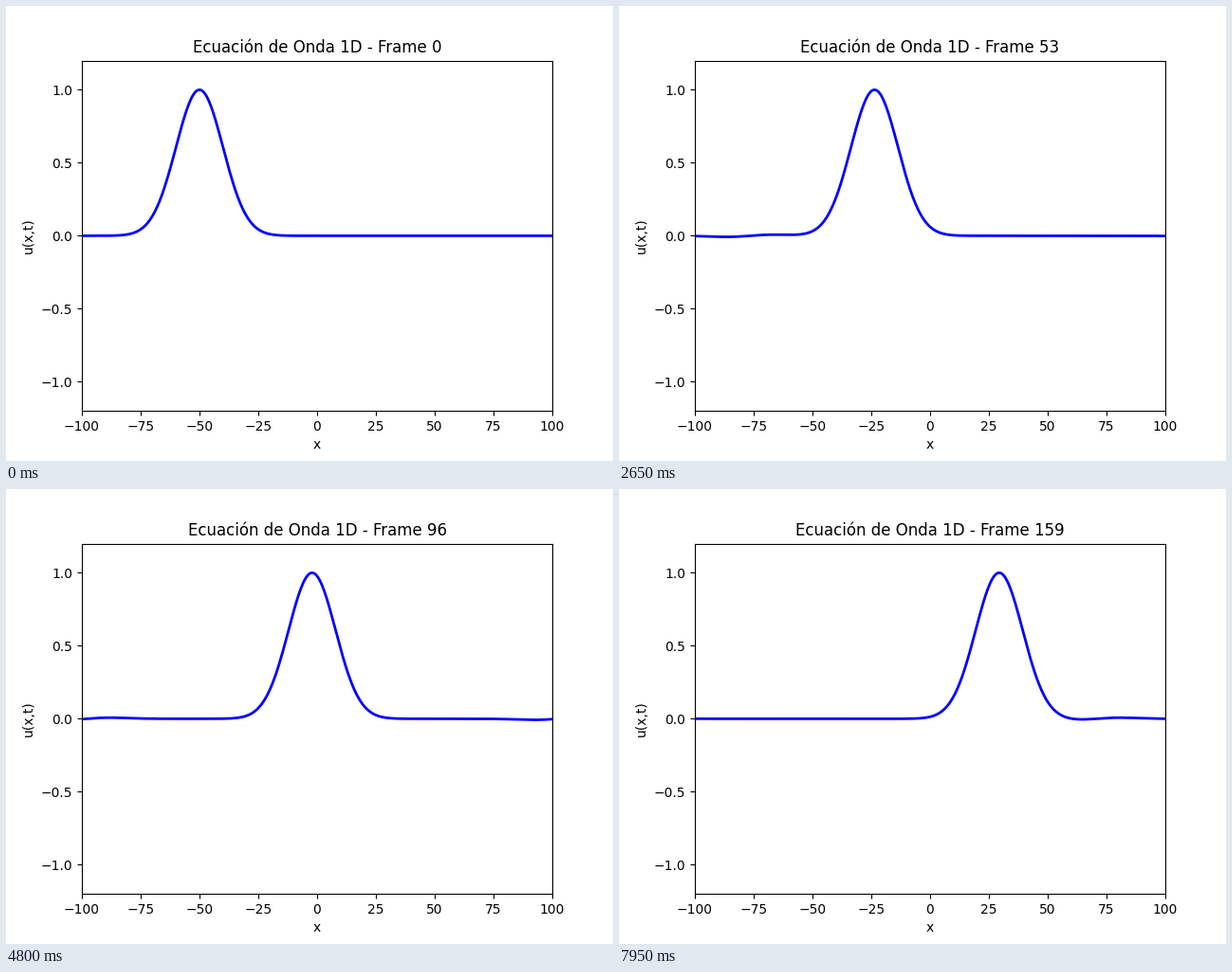
These frames come from a looping animation (640 by 480 pixels, 8 s). A matplotlib script:

```python
import numpy as np
import matplotlib.pyplot as plt
from matplotlib.animation import FuncAnimation

FRAMES = 160
INTERVAL = 50           # ms
HALF = 100.0            # domain is [-HALF, HALF], periodic
START, SIGMA = -50.0, 10.0
STEP = 0.5              # distance travelled per frame
EPS = STEP / 4          # first-order error of the starting step

x = np.linspace(-HALF, HALF, 401)


def pulse(center):
    """Gaussian and its slope on the periodic domain."""
    d = (x - center + HALF) % (2 * HALF) - HALF
    g = np.exp(-d**2 / (2 * SIGMA**2))
    return g, -d / SIGMA**2 * g


def wave(n):
    g, slope = pulse(START + STEP * n)
    _, back = pulse(START - STEP * n)
    return g + EPS * (slope - back)


fig, ax = plt.subplots(figsize=(6.4, 4.8), dpi=100)
line, = ax.plot(x, wave(0), color="blue", lw=2)
ax.set_xlim(-HALF, HALF)
ax.set_ylim(-1.2, 1.2)
ax.set_xlabel("x")
ax.set_ylabel("u(x,t)")
title = ax.set_title("Ecuación de Onda 1D - Frame 0")


def update(n):
    line.set_ydata(wave(n))
    title.set_text(f"Ecuación de Onda 1D - Frame {n}")
    return line, title


anim = FuncAnimation(fig, update, frames=FRAMES, interval=INTERVAL,
                     repeat=True, repeat_delay=0, blit=False)
plt.show()
```
